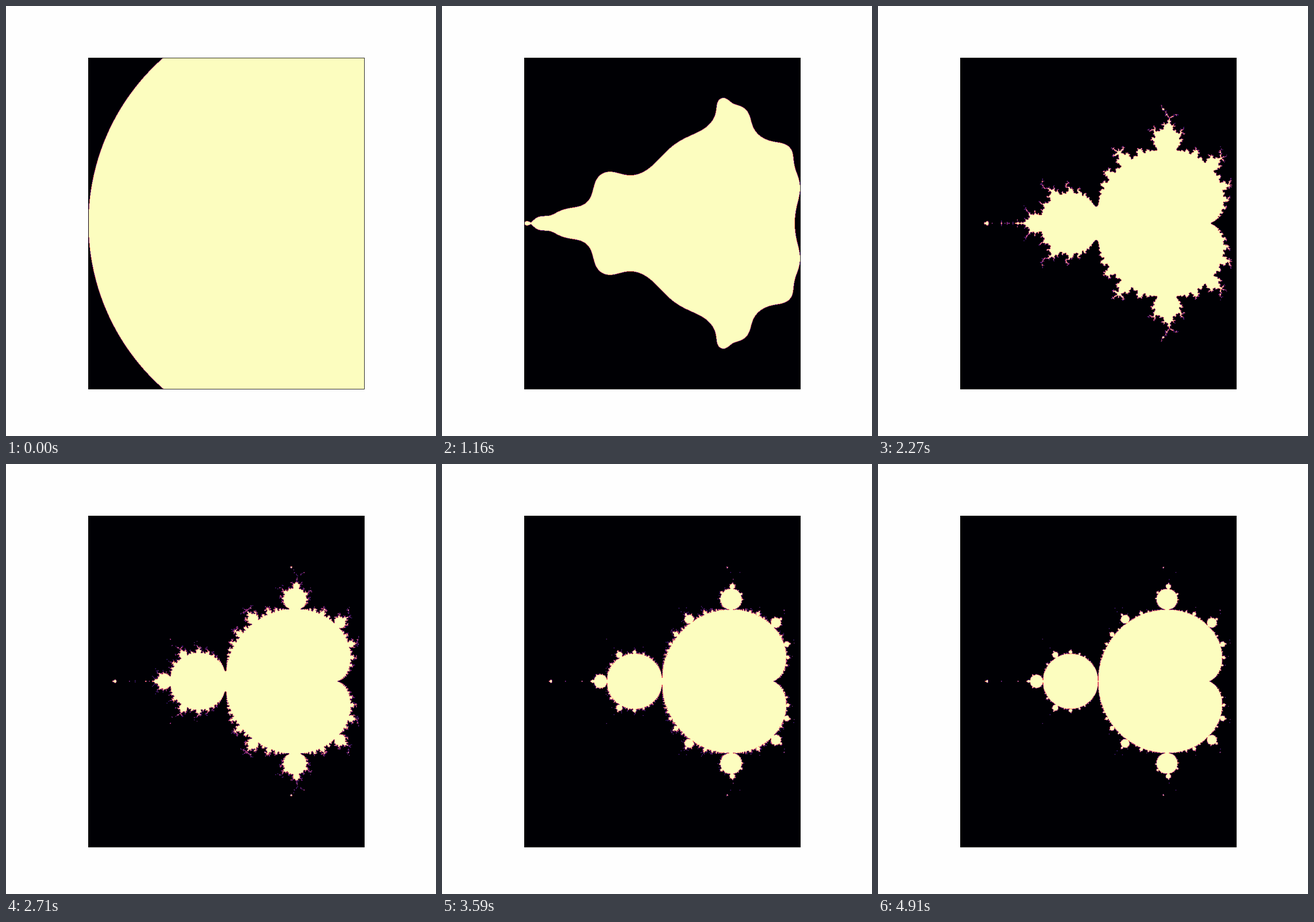
An HTML page with a canvas for the animation above (5020 ms loop, 748x748 px).

```html
<!DOCTYPE html>
<html>
<head>
<meta charset="utf-8">
<style>
  html, body { margin: 0; height: 100%; overflow: hidden; background: #fefefe; }
  canvas { display: block; }
</style>
</head>
<body>
<canvas id="stage" width="748" height="748"></canvas>
<script>
const ctx = document.getElementById('stage').getContext('2d');
const LOOP = 5020, MAX_ITER = 539;
const COLS = 625, ROWS = 750;              // sampled grid over [-2, 0.5] x [-1.5, 1.5]
const LEFT = 143, TOP = 90, W = 480, H = 576;

// Iteration at which each grid point leaves the disc of radius 2
function escapeTime(x, y) {
  let re = 0, im = 0;
  for (let i = 1; i <= MAX_ITER; i++) {
    const next = re * re - im * im + x;
    im = 2 * re * im + y;
    re = next;
    if (re * re + im * im > 4) return i;
  }
  return MAX_ITER + 1;
}

const escapes = new Uint16Array(COLS * ROWS);
for (let j = 0; j < ROWS / 2; j++) {
  const y = -1.5 + 3 * j / (ROWS - 1);
  for (let i = 0; i < COLS; i++) {
    const x = -2 + 2.5 * i / (COLS - 1);
    escapes[j * COLS + i] = escapes[(ROWS - 1 - j) * COLS + i] = escapeTime(x, y);
  }
}

// Magma colour map, interpolated between nine stops
const stops = ['000004', '1d1147', '51127c', '822681', 'b63679', 'e65164', 'fb8861', 'fec287', 'fcfdbf']
  .map(hex => [0, 2, 4].map(k => parseInt(hex.substr(k, 2), 16)));
const palette = Array.from({ length: 256 }, (_, v) => {
  const p = v / 255 * 8, k = Math.min(7, Math.floor(p));
  return stops[k].map((c, ch) => Math.round(c + (stops[k + 1][ch] - c) * (p - k)));
});

// Cubic B-spline taps that resample one axis from `from` samples to `to` pixels
function splineTaps(from, to) {
  return Array.from({ length: to }, (_, i) => {
    const pos = (i + 0.5) * from / to - 0.5, base = Math.floor(pos), f = pos - base;
    return {
      at: [-1, 0, 1, 2].map(k => Math.max(0, Math.min(from - 1, base + k))),
      weight: [(1 - f) ** 3, 3 * f ** 3 - 6 * f * f + 4, -3 * f ** 3 + 3 * f * f + 3 * f + 1, f ** 3].map(w => w / 6)
    };
  });
}
const tapsX = splineTaps(COLS, W), tapsY = splineTaps(ROWS, H);
const rowBlend = new Float32Array(COLS);
const picture = ctx.createImageData(W, H);

function draw(limit) {
  for (let j = 0, p = 0; j < H; j++) {
    rowBlend.fill(0);
    for (let k = 0; k < 4; k++) {
      const row = tapsY[j].at[k] * COLS, weight = tapsY[j].weight[k];
      for (let i = 0; i < COLS; i++) if (escapes[row + i] > limit) rowBlend[i] += weight;
    }
    for (let i = 0; i < W; i++, p += 4) {
      const { at, weight } = tapsX[i];
      let v = 0;
      for (let k = 0; k < 4; k++) v += rowBlend[at[k]] * weight[k];
      const color = palette[Math.min(255, Math.floor(v * 256))];
      picture.data[p] = color[0];
      picture.data[p + 1] = color[1];
      picture.data[p + 2] = color[2];
      picture.data[p + 3] = 255;
    }
  }
  ctx.fillStyle = '#fefefe';
  ctx.fillRect(0, 0, 748, 748);
  ctx.putImageData(picture, LEFT, TOP);
  ctx.lineWidth = 0.8;
  ctx.strokeRect(LEFT + 0.5, TOP + 0.5, W, H);
}

// The iteration limit grows by 15% a step; rounding makes the first ones linger
function limitAt(t) {
  if (t < 1390) return [0, 230, 700, 930, 1160].filter(start => start <= t).length;
  return Math.round(1.15 ** (13 + Math.floor((t - 1390) / 110)));
}

const begin = performance.now();
let shown = 0;
function tick() {
  const limit = limitAt((performance.now() - begin) % LOOP);
  if (limit !== shown) draw(shown = limit);
  requestAnimationFrame(tick);
}
tick();
</script>
</body>
</html>
```
